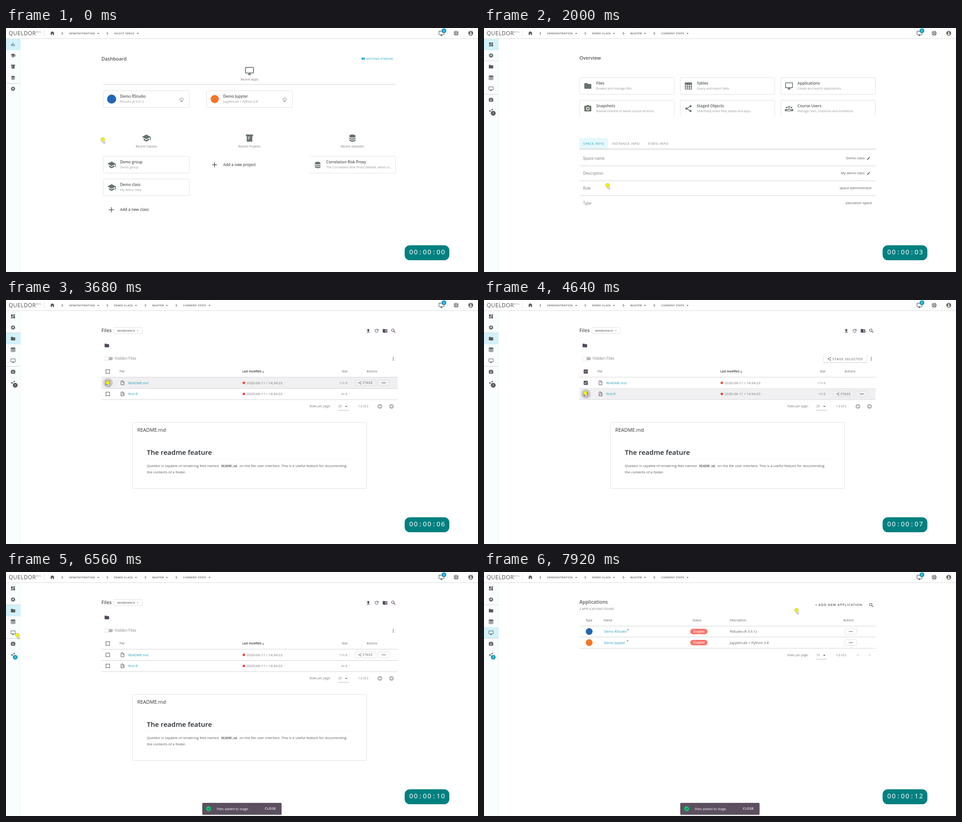
Write an HTML page that moves like this. It is 1039 by 539 pixels and loops after 8000 ms.

```html
<!DOCTYPE html>
<html lang="en">
<head>
<meta charset="utf-8">
<title>Staging files</title>
<style>
html, body { margin: 0; width: 100%; height: 100%; overflow: hidden; background: #fff; }
svg { display: block; width: 100vw; height: 100vh; font-family: "Open Sans", "Noto Sans", sans-serif; }
text { white-space: pre; }
</style>
</head>
<body>
<svg id="stage" viewBox="0 0 1039 539"></svg>
<script>
const LOOP = 8000, STEP = 80;
const INK = '#555958', SOFT = '#999', SAGE = '#66726a', PLUM = '#55495a', BLUE = '#1c9fbc', LINE = '#d4d4d4';
const BRAND = 'Queldor', HOST = 'https://queldor.cloud/org/32/space/522';

// Icons live on a 24 by 24 grid.
const path = d => `<path fill-rule="evenodd" d="${d}"/>`;
const ring = (r, w, extra = '') => `<circle cx="12" cy="12" r="${r}" fill="none" stroke="currentColor" stroke-width="${w}" ${extra}/>`;
const line = (d, w = 2, c = 'currentColor') => `<path d="${d}" fill="none" stroke="${c}" stroke-width="${w}"/>`;
const dot = (x, y, r) => `<circle cx="${x}" cy="${y}" r="${r}"/>`;
const ICONS = {
  home: path('M10 20v-6h4v6h5v-8h3L12 3 2 12h3v8z'),
  chevron: path('M10 6 8.6 7.4l4.6 4.6-4.6 4.6L10 18l6-6z'),
  left: line('M15 6l-6 6 6 6'),
  right: line('M9 6l6 6-6 6'),
  drop: path('M5 9l7 7 7-7z'),
  screen: path('M21 2H3a2 2 0 0 0-2 2v12a2 2 0 0 0 2 2h7v2H8v2h8v-2h-2v-2h7a2 2 0 0 0 2-2V4a2 2 0 0 0-2-2zM3 4h18v12H3z'),
  school: path('M5 13.2v4L12 21l7-3.8v-4L12 17zM12 3 1 9l11 6 9-4.9V17h2V9z'),
  data: path('M12 3C7.6 3 4 4.8 4 7s3.6 4 8 4 8-1.8 8-4-3.6-4-8-4zM4 9v3c0 2.2 3.6 4 8 4s8-1.8 8-4V9c0 2.2-3.6 4-8 4s-8-1.8-8-4zm0 5v3c0 2.2 3.6 4 8 4s8-1.8 8-4v-3c0 2.2-3.6 4-8 4s-8-1.8-8-4z'),
  gear: ring(5.6, 4) + ring(8.6, 3, 'stroke-dasharray="5 4"'),
  chart: path('M4 10h3v9H4zM10.5 5h3v14h-3zM17 13h3v6h-3z'),
  project: path('M3 3h18v4h-2v14H5V7H3zM8 9v2h5V9zM8 13v2h3v-2z'),
  board: path('M3 13h8V3H3zm0 8h8v-6H3zm10 0h8V11h-8zm0-18v6h8V3z'),
  folder: path('M10 4H4a2 2 0 0 0-2 2v12a2 2 0 0 0 2 2h16a2 2 0 0 0 2-2V8a2 2 0 0 0-2-2h-8z'),
  folderAdd: path('M10 4H4a2 2 0 0 0-2 2v12a2 2 0 0 0 2 2h16a2 2 0 0 0 2-2V8a2 2 0 0 0-2-2h-8zM15 9h2v3h3v2h-3v3h-2v-3h-3v-2h3z'),
  table: line('M3 3h18v18H3zM3 8.5h18M3 14.5h18M9 4v17M15 4v17') + path('M3 3h18v4H3z'),
  camera: path('M9 2 7.2 4H4a2 2 0 0 0-2 2v12a2 2 0 0 0 2 2h16a2 2 0 0 0 2-2V6a2 2 0 0 0-2-2h-3.2L15 2zM12 17a5 5 0 1 1 0-10 5 5 0 0 1 0 10z') + dot(12, 12, 3),
  share: dot(18, 5, 3) + dot(6, 12, 3) + dot(18, 19, 3) + line('M18 5 6 12l12 7'),
  people: dot(5, 9, 2.3) + dot(19, 9, 2.3) + line('M12 5.5a2.5 2.5 0 1 1 0 5 2.5 2.5 0 0 1 0-5zM6 19v-2c0-4 12-4 12 0v2z', 1.8) + path('M0 19v-3c0-3 4-3.5 5-3v6zM24 19v-3c0-3-4-3.5-5-3v6z'),
  power: line('M12 3v9M7 5.5a8 8 0 1 0 10 0M7 23h10', 1.7),
  buoy: ring(9, 2) + ring(4, 2) + line('M5.6 5.6l4 4M18.4 5.6l-4 4M5.6 18.4l4-4M18.4 18.4l-4-4', 3),
  user: path('M12 2a10 10 0 1 0 0 20 10 10 0 0 0 0-20zM12 5a3 3 0 1 1 0 6 3 3 0 0 1 0-6zM6 16c0-4 12-4 12 0a7 7 0 0 1-12 0z'),
  upload: path('M5 20h14v-2H5zM5 10h4v6h6v-6h4l-7-7z'),
  reload: path('M17.7 6.3A8 8 0 1 0 19.7 14h-2.1A6 6 0 1 1 12 6c1.7 0 3.1.7 4.2 1.8L13 11h7V4z'),
  search: ring(5.5, 2.2, 'transform="translate(-2.5 -2.5)"') + line('M14 14l6 6', 2.6),
  pencil: path('M3 17.3V21h3.7L17.8 9.9l-3.7-3.7zM20.7 7a1 1 0 0 0 0-1.4l-2.3-2.3a1 1 0 0 0-1.4 0l-1.9 1.8 3.8 3.8z'),
  file: line('M5 3h9l5 5v13H5zM13 3v6h6'),
  code: line('M5 3h9l5 5v13H5zM13 3v6h6M10 12l-2 2.5 2 2.5M14 12l2 2.5-2 2.5'),
  plus: line('M12 3v18M3 12h18', 2.4),
  more: dot(12, 5, 2.2) + dot(12, 12, 2.2) + dot(12, 19, 2.2),
  dots: dot(5, 12, 2.4) + dot(12, 12, 2.4) + dot(19, 12, 2.4),
  book: path('M1 4h10v15H1zM13 4h10v15H13zM15 8v1.5h6V8zM15 12v1.5h6V12z'),
  down: line('M12 4v15M6 13l6 6 6-6', 2.4),
  caret: line('M3 8l9 9 9-9', 3.5),
  goLeft: path('M12 1a11 11 0 1 0 0 22 11 11 0 0 0 0-22zM12 6v4h6v4h-6v4l-6-6z'),
  goRight: path('M12 1a11 11 0 1 0 0 22 11 11 0 0 0 0-22zM12 6v4H6v4h6v4l6-6z'),
  off: path('M3 3h18v18H3zM5 5v14h14V5z'),
  on: path('M3 3h18v18H3zM10 17 19 8l-1.4-1.4-7.6 7.6-3.6-3.6L5 12z'),
  some: path('M3 3h18v18H3zM7 11v2h10v-2z')
};

const icon = (name, x, y, size, color = INK) =>
  `<g transform="translate(${x - size / 2} ${y - size / 2}) scale(${size / 24})" fill="${color}" color="${color}">${ICONS[name]}</g>`;
// y is the middle of the capitals.
const text = (x, y, s, size, { c = INK, w = 400, ls = 0, a = 'start', f = '' } = {}) =>
  `<text x="${x}" y="${y + size * .357}" font-size="${size}" fill="${c}" font-weight="${w}" letter-spacing="${ls}" text-anchor="${a}"${f && ` font-family="${f}"`}>${s}</text>`;
const rect = (x, y, w, h, fill, extra = '') => `<rect x="${x}" y="${y}" width="${w}" height="${h}" fill="${fill}" ${extra}/>`;
const box = (x, y, w, h, r = 2) => rect(x + .5, y + .5, w - 1, h - 1, 'none', `stroke="#e1e1e1" rx="${r}"`);
const rule = (y, x1 = 210, x2 = 862, c = LINE) => rect(x1, y, x2 - x1, 1, c);
const group = (id, s) => `<g id="${id}">${s}</g>`;
const disc = (x, y, r, c) => `<circle cx="${x}" cy="${y}" r="${r}" fill="${c}"/>`;
const title = (y, s) => text(210, y, s, 10.5, { w: 600 });
const caps = (x, y, s) => text(x, y, s, 6, { w: 600, ls: .4 });
const small = (x, y, s, o) => text(x, y, s, 6.5, o);
const badge = (x, y, n, c) => disc(x, y, 5.3, c) + text(x, y, n, 6, { c: '#fff', a: 'middle' });

const crumb = (x, s, arrow) => caps(x, 11.5, s) + icon('drop', arrow, 12, 8);
const chevron = x => icon('chevron', x, 12, 12);

function header() {
  return rect(0, 0, 1039, 23, '#fff') + rule(23, 0, 1039, '#dadada') + rect(84, 4, 1, 17, '#e6e6e6') +
    text(6, 12, BRAND.toUpperCase(), 12, { c: '#505050', ls: .5 }) + text(66, 9, 'BETA', 5, { c: SOFT }) +
    icon('home', 102, 11.5, 12) + chevron(124) + crumb(139, 'DEMONSTRATION', 203) + chevron(223) +
    group('homeCrumbs', crumb(238, 'SELECT SPACE', 290)) +
    group('classCrumbs', crumb(238, 'DEMO CLASS', 286) + chevron(307) + crumb(322, 'MASTER', 354) + chevron(375) + crumb(390, 'CURRENT STATE', 448)) +
    icon('screen', 958.5, 12, 13) + badge(964, 6, 0, BLUE) + icon('buoy', 991, 11.5, 12.5) + icon('user', 1023, 11.5, 12.5);
}

function sidebar() {
  const column = names => names.map((n, i) => icon(n, 15.5, 36.3 + 24.5 * i, 11.5)).join('');
  return rect(0, 24, 32, 515, '#fafdfe') + rect(31, 24, 1, 515, '#f1f6f8') +
    rect(0, 24, 32, 25, '#d2f1fa', 'id="active"') +
    group('homeMenu', column(['chart', 'school', 'project', 'data', 'gear']) + rule(122, 0, 32)) +
    group('classMenu', column(['board', 'gear', 'folder', 'table', 'screen', 'camera', 'share']) + rule(72, 0, 32) + rule(146, 0, 32) +
      group('badge0', badge(20.3, 188.3, 0, '#555')) + group('badge2', badge(20.3, 188.3, 2, BLUE)));
}

function dashboard() {
  const entry = (x, y, mark, name, note) => box(x, y, 190, 38) + mark +
    text(x + 37, y + 13.5, name, 8.25, { w: 600 }) + text(x + 37, y + 24.3, note, 6.9, { c: SOFT });
  const section = (x, y, name, label) => icon(name, x, y, 21, SAGE) + small(x, y + 19, label, { a: 'middle', ls: .15, c: '#777' });
  const add = (x, y, s) => icon('plus', x, y, 15) + text(x + 19, y, s, 8.3, { w: 600 });
  return title(68, 'Dashboard') + icon('book', 786.5, 68, 8, BLUE) +
    text(793.3, 67.7, 'GETTING STARTED', 5.6, { c: BLUE, w: 600, ls: .7 }) +
    section(536, 95, 'screen', 'Recent Apps') + rule(124, 214, 858) +
    entry(214, 138, disc(232.5, 157, 10, '#2267b5'), 'Demo RStudio', 'RStudio (R 3.6.1)') + icon('power', 386.3, 157.5, 11) +
    entry(441, 138, disc(459.5, 157, 9, '#f37726'), 'Demo Jupyter', 'JupyterLab + Python 3.8') + icon('power', 613.3, 157.5, 11) +
    section(309, 243, 'school', 'Recent Classes') + section(536, 243, 'project', 'Recent Projects') + section(762.5, 243, 'data', 'Recent Datasets') +
    entry(214, 283, icon('school', 232.5, 302.5, 20, SAGE), 'Demo group', 'Demo group') +
    entry(214, 333, icon('school', 232.5, 352.5, 20, SAGE), 'Demo class', 'My demo class') +
    entry(668, 283, icon('data', 686, 302.5, 19, SAGE), 'Correlation Risk Proxy', 'The Correlation Risk Proxy dataset, which is…') +
    rect(667, 285, 2, 34, '#fff') + add(232, 401.5, 'Add a new class') + add(459, 302, 'Add a new project');
}

function overview() {
  const cards = [
    ['folder', 'Files', 'Browse and manage files'], ['table', 'Tables', 'Query and export data'],
    ['screen', 'Applications', 'Create and launch applications'], ['camera', 'Snapshots', 'Review timeline of saved course versions'],
    ['share', 'Staged Objects', 'Selectively share files, tables and apps'], ['people', 'Course Users', 'Manage roles, instances and invitations']
  ].map(([name, head, note], i) => {
    const x = 210 + 221.5 * (i % 3), y = i < 3 ? 109 : 159;
    return box(x, y, 209, 38) + (i ? '' : rect(211, 110, 207, 36, '#f0f0f0', 'id="cardHover"')) +
      icon(name, x + 18.5, y + 19, 18.5, SAGE) + text(x + 37, y + 13.5, head, 8.3, { w: 600 }) + text(x + 37, y + 24.2, note, 6.7, { c: SOFT });
  }).join('');
  const tab = (x, s, c) => text(x, 255, s, 7.2, { ls: .7, c });
  const info = [['Space name', 'Demo class'], ['Description', 'My demo class'], ['Role', 'space administrator'], ['Type', 'education space']]
    .map(([k, v], i) => {
      const y = 288 + 33 * i;
      return text(218, y, k, 8.4, { c: '#777' }) + text(i < 2 ? 838 : 854, y - .5, v, 7.65, { a: 'end' }) +
        (i < 2 ? icon('pencil', 846.5, y, 8.5) : '') + (i < 3 ? rule(y + 16) : '');
    }).join('');
  return title(66.5, 'Overview') + `<g clip-path="url(#cardClip)">${cards}</g>` + rect(210, 243, 63, 24, '#e4f8fc') +
    tab(218, 'SPACE INFO', BLUE) + tab(282, 'INSTANCE INFO', '#777') + tab(361, 'STATE INFO', '#777') + rule(267, 210, 862, '#bbb') + info;
}

const pager = (y, n) => small(668, y, 'Rows per page:', { c: '#777' }) + small(731.5, y + .5, n, { c: '#777' }) +
  icon('drop', 749, y + .5, 9) + rule(Math.round(y + 8), 731, 755, '#bbb') + small(775, y, '1-2 of 2', { c: '#777' });
const moreButton = (x, y) => box(x, y - 7, 27, 14) + icon('dots', x + 13.5, y, 10);

function files() {
  const check = (id, y) => group(id, ['off', 'some', 'on'].map(s => `<g data-state="${s}">${icon(s, 224, y, 12, PLUM)}</g>`).join(''));
  const row = (n, y, kind, name, size) =>
    rect(210, y - 12, 652, 24, '#f0eff1', `id="shade${n}"`) + group('halo' + n, disc(224.5, y, 10.5, '#cbc9cc')) +
    check('check' + n, y) + icon(kind, 256.5, y, 11.5, PLUM) + text(269, y, name, 7.6, { c: BLUE }) +
    `<circle class="state" cx="523.5" cy="${y}" r="2.8"/>` + text(530, y, '2020-06-11 / 14:34:23', 7.8, { c: '#777' }) +
    text(752, y, size, 7.2, { c: '#999', a: 'end' }) +
    group('tools' + n, box(768, y - 7, 47, 14) + icon('share', 779, y, 7.5) + text(785, y, 'STAGE', 6.3, { ls: .8 }) + moreButton(818, y)) +
    rule(y + 12);
  const stageButton = rect(747.5, 121, 95.5, 18, '#fff', 'id="stageFace" rx="1.5"') + rule(138, 748, 843, '#d0d0d0') +
    rect(842, 121, 1, 18, '#e6e6e6') + rect(747, 121, 1, 18, '#e6e6e6') +
    '<g clip-path="url(#buttonClip)"><circle id="ripple" cx="754" cy="130" fill="#c8c9c5"/></g>' +
    icon('share', 760, 130, 9) + text(767, 130, 'STAGE SELECTED', 7.2, { ls: .8 });
  const readme = box(278, 270, 516, 147, 3) + text(289, 287, 'README.md', 10.85, { c: '#333' }) +
    text(310, 337, 'The readme feature', 15, { w: 600, c: '#24292e' }) + rule(351, 310, 760, '#f3f3f3') +
    text(310, 366, BRAND + ' is capable of rendering files named', 7.75) +
    rect(472, 361, 39, 11, '#f8f8f8') + text(474, 366.5, 'README.md', 6.4, { f: "'DejaVu Sans Mono', monospace", c: '#333' }) +
    text(514, 366, 'on the file user interface. This is a useful feature for documenting', 7.75) +
    text(310, 380, 'the contents of a folder.', 7.75);
  return title(67, 'Files') + box(237, 60, 64, 15) + caps(245, 67.5, 'WORKSPACE') + icon('caret', 290, 67.5, 5) +
    ['upload', 'reload', 'folderAdd', 'search'].map((n, i) => icon(n, 797.5 + 18.4 * i, 68, 12, PLUM)).join('') +
    icon('folder', 222, 100.5, 12, PLUM) + rect(218, 126, 17, 7, '#b9b5ba', 'rx="3.5"') +
    '<circle cx="221" cy="129.5" r="5.2" fill="#fff" stroke="#ddd" stroke-width=".8"/>' + text(239, 129, 'Hidden Files', 8.4, { c: '#888' }) +
    group('stageButton', stageButton) + icon('more', 852.5, 130, 10.5) + check('checkAll', 158) +
    small(250, 158, 'File') + text(520, 158, 'Last modified', 6.4, { w: 600, c: '#333' }) + icon('down', 566, 158.5, 8) +
    small(739.5, 158, 'Size') + small(794, 158, 'Actions', { ls: .2 }) + rule(170) +
    row(1, 183, 'file', 'README.md', '174 B') + row(2, 207.5, 'code', 'first.R', '44 B') +
    pager(234.5, 25) + icon('goLeft', 823, 235, 11.5, '#b9b2bb') + icon('goRight', 848.5, 235, 11.5, '#b9b2bb') + group('readme', readme);
}

function apps() {
  const row = (y, color, name, note, end) => disc(231.5, y, 7.5, color) + text(264, y, name, 7.5, { c: BLUE }) +
    line(`M${end} ${y - 2}l3-3m-2.5 0h2.5v2.5`, .7, INK) + rect(454, y - 6, 38, 12, '#fa7268', 'rx="6"') +
    text(473, y, 'Stopped', 6.4, { c: '#fff', w: 600, a: 'middle' }) + text(541, y, note, 7.8) + moreButton(794, y) + rule(Math.floor(y + 12));
  return title(66.5, 'Applications') + text(210, 81.5, '2 APPLICATIONS FOUND', 6.2, { ls: .3, c: '#777' }) +
    text(729, 73, '+ ADD NEW APPLICATION', 7, { w: 600, ls: .9 }) + icon('search', 852.5, 73, 12) +
    [[223.5, 'Type'], [263.5, 'Name'], [459, 'Status'], [541, 'Description'], [791, 'Actions']].map(([x, s]) => small(x, 107, s, { ls: .15 })).join('') +
    rule(119) + row(131.5, '#2267b5', 'Demo RStudio', 'RStudio (R 3.6.1)', 315) + row(156, '#f37726', 'Demo Jupyter', 'JupyterLab + Python 3.8', 314) +
    pager(183.5, 10) + icon('left', 823, 183.5, 10, '#999') + icon('right', 848.5, 183.5, 10, '#999');
}

const snackbar = rect(432, 511, 175, 27, '#000', 'rx="2" opacity=".18"') + rect(432, 510, 174.5, 26, '#5c5060', 'rx="2"') +
  disc(446, 523, 5.5, '#14c574') + line('M443.3 523l2 2 3.5-3.8', 1.1, '#3d3540') +
  text(464, 523, 'Files added to stage.', 7.45, { c: '#fff' }) + text(570, 523, 'CLOSE', 7, { c: '#fff', w: 600, ls: .6 });
const digitX = Array.from({ length: 8 }, (_, i) => 892 + 10 * i).join(' ');
const clock = rect(877.5, 480, 98.5, 33, '#008080', 'rx="11.5"') +
  `<text id="clock" x="${digitX}" y="500.3" font-family="'Noto Sans', sans-serif" font-weight="300" font-size="14.5" fill="#fff" text-anchor="middle"></text>`;
const link = rect(0, 532, 345, 7, '#2c2630') + '<text id="url" x="1" y="537.3" font-size="4.4" fill="#fff"></text>';
const pointer = '<path d="M0 0v7.5l1.8-1.6 1.2 2.6 1.3-.5-1.2-2.6h2.3z" fill="#fff" stroke="#777" stroke-width=".6"/>' +
  '<circle id="spot" cy="-.5" fill="#f0ee22" stroke="#8c8a3c" stroke-width=".5"/>';

document.getElementById('stage').innerHTML =
  '<defs><clipPath id="cardClip"><rect x="200" y="100" width="670" height="95"/></clipPath>' +
  '<clipPath id="buttonClip"><rect x="748" y="121.5" width="95" height="17"/></clipPath></defs>' +
  sidebar() + header() + group('dashboard', dashboard()) + group('overview', overview()) + group('files', files()) + group('apps', apps()) +
  group('snackbar', snackbar) + group('link', link) + clock + group('pointer', pointer);

const $ = id => document.getElementById(id);
const show = (id, on) => $(id).setAttribute('display', on ? 'inline' : 'none');
const set = (id, name, v) => $(id).setAttribute(name, v);
const clamp = v => Math.max(0, Math.min(1, v));

const MOVES = [
  [800, 213, 247], [1200, 274, 350], [1840, 272, 348], [2000, 272, 348], [2640, 318, 136], [2960, 321, 138],
  [3040, 321, 138], [3600, 224, 183], [4400, 224, 183], [4640, 223, 206], [4960, 223, 206], [5600, 753, 126],
  [5840, 754, 126], [6480, 25, 140], [7120, 25, 140], [7920, 688, 85]
];
const CLICKS = [1280, 2720, 4320, 4800, 5760, 6720];

function cursorAt(t) {
  const i = MOVES.findIndex(m => m[0] > t);
  if (i < 1) return (i ? MOVES[MOVES.length - 1] : MOVES[0]).slice(1);
  const [t0, x0, y0] = MOVES[i - 1], [t1, x1, y1] = MOVES[i];
  const p = (t - t0) / (t1 - t0), e = p * p * (3 - 2 * p);
  return [x0 + (x1 - x0) * e, y0 + (y1 - y0) * e];
}

function setCheck(id, state) {
  for (const g of $(id).children) g.setAttribute('display', g.dataset.state === state ? 'inline' : 'none');
}

function render(t) {
  const within = (a, b) => t >= a && t < b;
  const [x, y] = cursorAt(t), inClass = t >= 1520, onFiles = within(2880, 6880);
  show('homeCrumbs', !inClass); show('homeMenu', !inClass);
  show('classCrumbs', inClass); show('classMenu', inClass);
  show('dashboard', !inClass); show('overview', within(1680, 2880));
  show('files', onFiles); show('apps', t >= 6880);
  set('active', 'y', t < 2880 ? 24 : t < 6800 ? 73 : 122);

  const staged = t >= 5920, one = within(4320, 5920), two = within(4800, 5920);
  show('badge0', !staged); show('badge2', staged);
  show('cardHover', x > 210 && x < 419 && y > 110 && y < 147);
  setCheck('check1', one ? 'on' : 'off');
  setCheck('check2', two ? 'on' : 'off');
  setCheck('checkAll', two ? 'on' : one ? 'some' : 'off');
  show('stageButton', one);
  set('stageFace', 'fill', within(5520, 5920) ? '#e6e7e4' : '#fff');
  set('ripple', 'r', 80 * clamp((t - 5600) / 160));
  show('readme', t >= 3280);
  document.querySelectorAll('.state').forEach(c => c.setAttribute('fill', t < 3200 ? '#555' : '#f44336'));

  const lastRow = t < 3520 ? 0 : within(4560, 5040) ? 2 : 1;
  [1, 2].forEach(n => {
    const mid = n === 1 ? 183 : 207.5, over = onFiles && x > 210 && Math.abs(y - mid) < 12.3;
    show('shade' + n, over);
    show('halo' + n, over && Math.abs(x - 224) < 10);
    show('tools' + n, lastRow === n);
  });

  show('snackbar', staged);
  set('snackbar', 'opacity', clamp((t - 5840) / 240));
  show('link', within(2560, 3040) || within(6640, 7200));
  $('url').textContent = HOST + '/instance/3088/snapshot/24043/' + (t < 5000 ? 'files' : 'applications');
  $('clock').textContent = '00:00:' + String(Math.floor((t + 160) / 640)).padStart(2, '0');

  const press = Math.max(...CLICKS.map(c => clamp(1 - Math.abs(t - c) / 160)));
  set('pointer', 'transform', `translate(${x} ${y})`);
  set('spot', 'r', 4.4 + 7.4 * press);
}

const start = performance.now();
function tick() {
  const t = (performance.now() - start) % LOOP;
  render(Math.floor(t / STEP) * STEP);
  requestAnimationFrame(tick);
}
tick();
</script>
</body>
</html>
```
